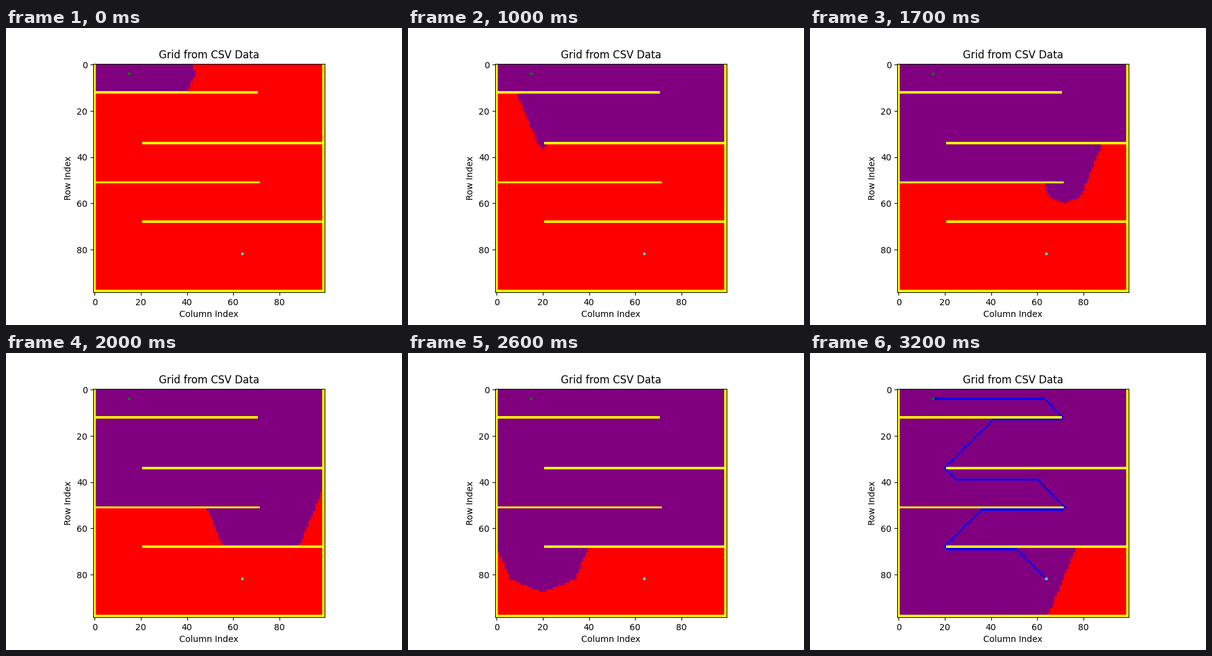
These frames come from a looping animation (640 by 480 pixels, 4.28 s). A matplotlib script:

```python
import itertools
import math

import matplotlib.pyplot as plt
import numpy as np
from matplotlib.animation import FuncAnimation
from matplotlib.colors import ListedColormap

ROWS, COLS = 99, 100
START, GOAL = (4, 15), (82, 64)
FREE, WALL, SEEN, BEGIN, END, PATH, REACHED = range(7)
COLORS = ["red", "yellow", "purple", "green", "turquoise", "blue", "cyan"]

LOOP_MS, TICK_MS, STEP_MS = 4280, 20, 100
LAST_STEP = 32
FIRST_BATCH, BATCH = 502, 250

# Corners of the shortest route as (row, column)
ROUTE = [START, (4, 63), (12, 71), (13, 70), (13, 41), (34, 20), (39, 25),
         (39, 60), (51, 72), (52, 71), (52, 36), (68, 20), (69, 21),
         (69, 51), GOAL]


def build_grid():
    grid = np.full((ROWS, COLS), FREE)
    grid[:, [0, -1]] = WALL
    grid[-1] = WALL
    grid[12, :71] = WALL
    grid[34, 21:] = WALL
    grid[51, :72] = WALL
    grid[68, 21:] = WALL
    return grid


def distances(grid):
    """Shortest 8-way walking distance from START to every cell."""
    pad = np.full((ROWS + 2, COLS + 2), np.inf)
    inner = pad[1:-1, 1:-1]
    inner[START] = 0
    moves = [m for m in itertools.product((-1, 0, 1), repeat=2) if any(m)]
    while True:
        best = inner.copy()
        for dr, dc in moves:
            near = pad[1 + dr:ROWS + 1 + dr, 1 + dc:COLS + 1 + dc]
            best = np.minimum(best, near + math.sqrt(dr * dr + dc * dc))
        best[grid == WALL] = np.inf
        if np.array_equal(best, inner):
            return best
        inner[:] = best


def draw_route(cells):
    for (r0, c0), (r1, c1) in zip(ROUTE, ROUTE[1:]):
        n = max(abs(r1 - r0), abs(c1 - c0)) + 1
        rows = np.linspace(r0, r1, n).round().astype(int)
        cols = np.linspace(c0, c1, n).round().astype(int)
        cells[rows, cols] = PATH


grid = build_grid()
order = np.argsort(distances(grid), axis=None, kind="stable")


def cells_at(step):
    cells = grid.copy()
    cells.flat[order[:FIRST_BATCH + BATCH * step]] = SEEN
    done = step == LAST_STEP
    if done:
        draw_route(cells)
    cells[START] = BEGIN
    cells[GOAL] = REACHED if done else END
    return cells


fig, ax = plt.subplots(figsize=(6.4, 4.8), dpi=100)
image = ax.imshow(cells_at(0), cmap=ListedColormap(COLORS),
                  vmin=-0.5, vmax=len(COLORS) - 0.5, interpolation="nearest")
ax.set_title("Grid from CSV Data")
ax.set_xlabel("Column Index")
ax.set_ylabel("Row Index")


def update(i):
    step = min(i * TICK_MS // STEP_MS, LAST_STEP)
    image.set_data(cells_at(step))
    return [image]


anim = FuncAnimation(fig, update, frames=LOOP_MS // TICK_MS,
                     interval=TICK_MS, repeat=True, repeat_delay=0)
plt.show()
```
